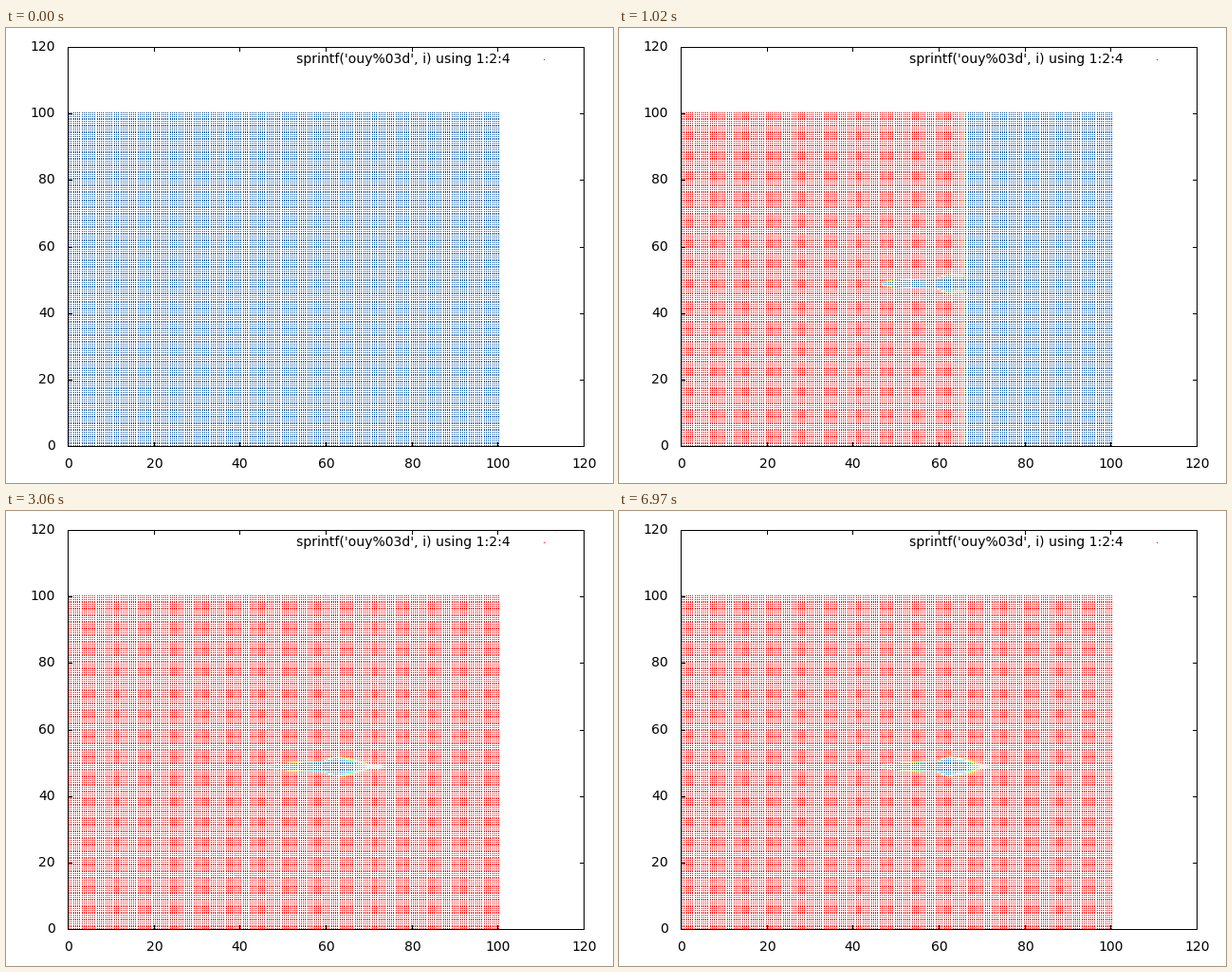
These frames come from a looping animation (640 by 480 pixels, 7.14 s). A matplotlib script:

```python
import numpy as np
import matplotlib.pyplot as plt
from matplotlib.animation import FuncAnimation

W, H, DPI = 640, 480, 100
FRAMES, INTERVAL = 42, 170
LEFT, RIGHT, TOP, BOTTOM = 65, 609, 20, 441
AXIS_MAX = 120
SUBPIXEL = 0.12        # origin lies slightly off the pixel centre
CELLS = 200            # two grid points per axis unit
MIDLINE = 97.5         # row the cold streak is centred on

STOPS = [0, 0.25, 0.45, 0.65, 0.82, 1]
COLOURS = np.array([(0, 80, 160), (0, 190, 215), (0, 215, 70),
                    (255, 255, 0), (255, 150, 0), (255, 0, 0)])


def to_px(units, start, end):
    """Axis units to whole pixels."""
    exact = start + SUBPIXEL + units * (end - start) / AXIS_MAX
    return np.rint(exact).astype(int)


col = np.arange(CELLS + 1)
dot_x = to_px(col / 2, LEFT, RIGHT) + 1
dot_y = to_px(col / 2, BOTTOM, TOP) - 1
offset = np.abs(col - MIDLINE)[:, None]

ticks = np.arange(0, AXIS_MAX + 1, 20)
tick_x = to_px(ticks, LEFT, RIGHT)
tick_y = to_px(ticks, BOTTOM, TOP)


def sigmoid(x):
    return 1 / (1 + np.exp(-np.clip(x, -40, 40)))


def palette(v):
    channels = [np.interp(v, STOPS, COLOURS[:, k]) for k in range(3)]
    return np.rint(np.stack(channels, axis=-1)).astype(np.uint8)


def streak(n):
    """Cold dart in the middle with a wake that shortens over time."""
    age = max(n - 8, 0)
    tip = 141.5 + 7 * np.exp(-age / 16) + 17 * np.exp(-age / 2)
    bulge = 4.0 + 0.6 * np.exp(-age / 15)
    half = np.interp(col, [91, 93, 102, 118, 124, 129, 140, tip, tip + 2],
                     [-1.5, 0.7, 2.2, 2.9, 5.6, bulge, 1.2, 0.9, -1.5])
    steep = np.interp(col, [118, 128], [5, 2])
    edge = sigmoid(steep * (offset - half))
    core = 0.65 * np.clip((col - 132) / 8, 0, 1)
    return edge + (1 - edge) * core


def field(n):
    """Values 0..1: a hot front sweeps right and leaves the streak behind."""
    if n == 0:
        return np.zeros((CELLS + 1, CELLS + 1))
    lag = 6 * np.exp(-offset / 10) if n > 6 else 0
    front = sigmoid(2.5 * (21.9 * n - 0.6 - lag - col))
    return front * streak(n)


def draw_axes(img):
    img[[TOP, BOTTOM], LEFT:RIGHT + 1] = 0
    img[TOP:BOTTOM + 1, [LEFT, RIGHT]] = 0
    for x in tick_x:
        img[TOP:TOP + 5, x] = 0
        img[BOTTOM - 4:BOTTOM + 1, x] = 0
    for y in tick_y:
        img[y, LEFT:LEFT + 5] = 0
        img[y, RIGHT - 4:RIGHT + 1] = 0


def render(n):
    img = np.full((H, W, 3), 255, np.uint8)
    dots = palette(field(n))
    img[dot_y[:, None], dot_x] = dots
    img[33, 567] = dots[-1, -1]
    draw_axes(img)
    return img


plt.rcParams["font.family"] = "DejaVu Sans"
plt.rcParams["font.size"] = 14 * 72 / DPI
fig = plt.figure(figsize=(W / DPI, H / DPI), dpi=DPI, facecolor="white")
ax = fig.add_axes([0, 0, 1, 1])
ax.axis("off")
picture = ax.imshow(render(0), extent=(0, W, H, 0),
                    interpolation="nearest", aspect="auto")
ax.set_xlim(0, W)
ax.set_ylim(H, 0)

for value, x, y in zip(ticks, tick_x, tick_y):
    ax.text(x + 0.5, 464, str(value), ha="center", va="baseline")
    ax.text(52, y + 4, str(value), ha="right", va="baseline")
ax.text(531.5, 37, "sprintf('ouy%03d', i) using 1:2:4",
        ha="right", va="baseline")


def update(n):
    picture.set_data(render(n))
    return [picture]


anim = FuncAnimation(fig, update, frames=FRAMES, interval=INTERVAL,
                     repeat=True, repeat_delay=0)
plt.show()
```
